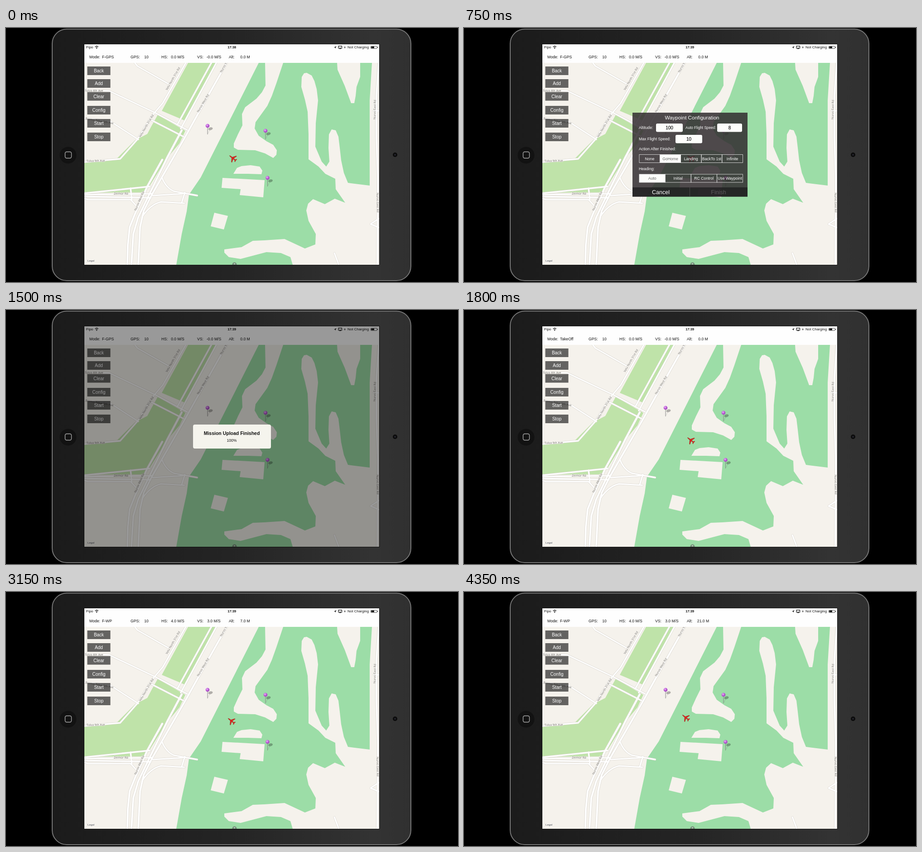
These frames come from a looping animation (998x561 px, 4.5 s). An HTML page:

```html
<!DOCTYPE html>
<html lang="en">
<head>
<meta charset="utf-8">
<title>Waypoint mission</title>
<style>
  html, body { margin: 0; width: 100%; height: 100%; overflow: hidden; background: #000; }
  svg { display: block; width: 998px; height: 561px; font-family: "Liberation Sans", Arial, sans-serif; }
  .mid { text-anchor: middle; }
  .bar { font-size: 8.6px; fill: #111; }
  .status { font-size: 8px; fill: #111; }
  .street { font: 6.6px "Open Sans", sans-serif; fill: #77746f; stroke: #f8f6f2; stroke-width: 1.2; paint-order: stroke; }
  .road { fill: none; stroke-linejoin: round; stroke-linecap: round; }
  .small { font-size: 8.7px; fill: #fff; }
  .box { fill: #fdfdfb; }
  .num { font-size: 10px; fill: #111; stroke: #111; stroke-width: .2; text-anchor: middle; }
</style>
</head>
<body>
<svg viewBox="0 0 998 561">
  <defs>
    <linearGradient id="shell">
      <stop offset="0" stop-color="#1b1b1b"/>
      <stop offset=".5" stop-color="#242424"/>
      <stop offset=".9" stop-color="#333"/>
      <stop offset="1" stop-color="#303030"/>
    </linearGradient>
    <radialGradient id="bead" cx=".38" cy=".35" r=".7">
      <stop offset="0" stop-color="#f0c8fa"/>
      <stop offset=".4" stop-color="#c566de"/>
      <stop offset="1" stop-color="#9a45b4"/>
    </radialGradient>
    <clipPath id="mapArea"><path d="M173 77H824V523H173z"/></clipPath>
    <path id="wide" d="M490 72 L437 166 397 238 355 311 322 368 304 404 296 440 292 523
      M345 291 L312 350 285 410 273 440 269 480 268 523
      M388 226 L356 286 320 360 292 418 281 455 277 523
      M823 77 L818 150 818 240 821 330 820 523"/>
    <path id="thin" d="M455 74 L378 214 M466 74 L386 222
      M398 75 L346 166 322 194 290 246 252 289 173 296
      M173 137 L228 139 329 187 400 225 M320 203 L392 240
      M173 199 L230 206 292 246 M283 75 L290 84 358 123
      M173 365 L318 350 M173 368 L324 366 M173 372 L320 375 M173 376 L180 379 275 379 289 394
      M275 354 L278 380 M345 332 Q354 354 372 361 L422 370 M324 370 L390 366
      M395 363 L388 386 M300 418 Q318 390 342 384 L394 387
      M812 183 H824 M826 419 L805 433 826 442 M725 497 L736 526"/>
  </defs>

  <rect x="102" y="2.5" width="792" height="555.5" rx="32" fill="url(#shell)" stroke="#777" stroke-width="2"/>
  <circle cx="137" cy="281" r="18.5" fill="#121212"/>
  <rect x="130.5" y="273.5" width="14" height="14" rx="3.5" fill="none" stroke="#aaa" stroke-width="1.4"/>
  <circle cx="859" cy="280" r="5" fill="#0b0b0b"/>
  <circle cx="859" cy="280" r="2" fill="#24242c"/>
  <rect x="172" y="35" width="653" height="489" fill="#111"/>
  <rect x="173" y="36" width="651" height="487" fill="#fefefe"/>

  <g clip-path="url(#mapArea)">
    <rect x="173" y="77" width="651" height="446" fill="#f5f2ec"/>
    <path fill="#bfe3a9" d="M402 77H464L396 205 344 183z
      M335 192L396 227 383 255 355 288 315 352 303 363 173 364V294L243 290 285 248 312 234 322 215z"/>
    <path fill="#9cdda7" d="M558 77H572L573 127 565 142 553 156 528 175 521 190 522 215 512 235 503 255 503 264 512 269
      550 270 572 277 590 287 597 280 598 270 590 258 575 250 558 238 549 222 551 208 577 172 587 150 597 122 612 77
      H731L732 92 748 128 762 166 769 166 772 150 774 130 782 108 782 77H808L803 160V348L755 342 746 320 740 292 737 265 734 240
      728 226 719 224 713 235 712 265 714 295 707 306 697 295 683 262 684 210 689 160 686 135 681 117 675 105 664 99 658 100
      653 108 652 130 660 158 666 185 668 235 668 290 690 306 705 322 727 333 728 356 749 386 726 377 704 389 678 378
      667 388 663 403 668 426 684 455 683 478 660 487 615 466 570 469 545 470 520 484 482 489
      V496L492 506 518 510 575 495 607 497 628 506 633 523H376L388 455 399 405 404 368 430 330z"/>
    <path fill="#f5f2ec" d="M502 322L510 309 520 305 540 303 560 306 566 315 564 323 535 322z
      M478 331L571 336 568 374 516 369 518 356 476 353z M460 408L490 415 481 445 452 438z"/>
    <g class="road">
      <use href="#thin" stroke="#dcd8d1" stroke-width="4.4"/>
      <use href="#wide" stroke="#dcd8d1" stroke-width="5.4"/>
      <use href="#thin" stroke="#fff" stroke-width="3"/>
      <use href="#wide" stroke="#fff" stroke-width="3.8"/>
    </g>
    <g id="streets" class="street"></g>
    <circle cx="504.5" cy="522.5" r="5" fill="#76927b"/>
    <circle cx="504.5" cy="521" r="1.4" fill="#c4d8c6"/>
    <text x="180" y="516" font-size="6.2" fill="#444" stroke="#fff" stroke-width="1" paint-order="stroke">Legal</text>
    <g id="pins"></g>
    <g id="plane">
      <path transform="rotate(-52) scale(.9)" fill="#e0211d" stroke="#7c2a20" stroke-width=".5"
        d="M0-10.5Q1.2-9 1.2-5V-2.5L9.5 3V4.6L1.3 1.8 .9 6.5 3.8 8.8V10L0 9-3.8 10V8.8L-.9 6.5-1.3 1.8-9.5 4.6V3L-1.2-2.5V-5Q-1.2-9 0-10.5z"/>
    </g>
  </g>

  <g class="status">
    <text x="177" y="45.3">Fipo</text>
    <g fill="none" stroke="#111" stroke-width="1.2">
      <path d="M196.6 41.6Q200.2 38.4 203.8 41.6M198.2 43.6Q200.2 41.9 202.2 43.6"/>
      <path d="M735.5 44.6H734V39.8H741.5V44.6H740"/>
    </g>
    <circle cx="200.2" cy="45" r=".9"/>
    <path d="M724 43L729.5 40 727 45.8 726.7 43.2zM735.2 46.2L737.8 42.8 740.4 46.2z"/>
    <circle cx="748" cy="42.7" r="2" fill="#8a8a8a"/>
    <text id="clock" class="mid" x="498.7" y="45.3" style="font-size:7.4px" font-weight="bold"></text>
    <text x="754" y="45.3">Not Charging</text>
    <rect x="805.5" y="40.2" width="13.6" height="5.2" rx="1" fill="none" stroke="#111" stroke-width=".7"/>
    <path d="M806.4 41.1H813V44.5H806.4zM819.8 41.8H821V43.8H819.8z"/>
  </g>
  <g class="bar">
    <text x="184" y="66.6">Mode:</text><text id="mode" x="212" y="66.6"></text>
    <text x="275" y="66.6">GPS:</text><text class="mid" x="310" y="66.6">10</text>
    <text x="343" y="66.6">HS:</text><text id="hs" class="mid" x="379" y="66.6"></text>
    <text x="422" y="66.6">VS:</text><text id="vs" class="mid" x="459" y="66.6"></text>
    <text x="492" y="66.6">Alt:</text><text id="alt" class="mid" x="528" y="66.6"></text>
  </g>
  <g id="buttons" class="mid" font-size="10" fill="#fff"></g>

  <g id="dialog" visibility="hidden">
    <rect x="372" y="187" width="254" height="185.5" fill="#322c30" fill-opacity=".85"/>
    <rect x="372" y="352" width="254" height="20.5" fill="#1d1c1e" fill-opacity=".75"/>
    <path d="M498.5 352V372.5" stroke="#555" stroke-width=".8"/>
    <text class="mid" x="503.5" y="202" font-size="11.6" fill="#fff">Waypoint Configuration</text>
    <g class="small">
      <text x="386" y="223">Altitude:</text>
      <text x="489" y="223" style="font-size:8.2px">Auto Flight Speed:</text>
      <text x="386" y="248">Max Flight Speed:</text>
      <text x="386" y="269.5">Action After Finished:</text>
      <text x="386" y="314">Heading:</text>
      <g id="segments" class="mid"></g>
    </g>
    <rect class="box" x="424" y="211" width="59" height="18.5" rx="3"/><text class="num" x="453.5" y="224">100</text>
    <rect class="box" x="559" y="211" width="55" height="18.5" rx="3"/><text class="num" x="586.5" y="224">8</text>
    <rect class="box" x="467" y="236" width="59" height="18.5" rx="3"/><text class="num" x="496.5" y="249">10</text>
    <g class="mid" font-size="12.5" fill="#fff">
      <text x="434.5" y="367">Cancel</text>
      <text id="finish" x="562" y="367">Finish</text>
    </g>
  </g>

  <g id="alert" visibility="hidden">
    <rect x="172" y="35" width="653" height="489" opacity=".4"/>
    <rect x="413" y="253" width="172" height="53" rx="4" fill="#f5f4ed"/>
    <text id="alertTitle" class="mid" x="498.5" y="276" font-size="10.5" font-weight="bold" fill="#111"></text>
    <text id="percent" class="mid" x="498.5" y="291" font-size="8.6" fill="#111"></text>
  </g>
</svg>
<script>
const LOOP = 4500, STEP = 150;
const el = id => document.getElementById(id);
const fill = (id, items, draw) => { el(id).innerHTML = items.map(draw).join(""); };

fill("streets", [
  ["Velu North 31st Rd", 356, 138, -60], ["Velu North 31st Rd", 297, 242, -59],
  ["Nurvo West Rd", 425, 187, -59], ["Nurvo West Rd", 476, 99, -60], ["Nurvo West Rd", 287, 404, -66],
  ["Nurvo East Rd", 816, 202, -89], ["Nurvo East Rd", 818, 364, 89],
  ["Tolva 4th Ave", 174, 141, 0], ["Bremo Tolva 5th Ave", 175, 202, 10],
  ["Tolva 9th Ave", 178, 296, -1], ["Zelmor Rd", 238, 368, 0]
], ([name, x, y, turn]) => `<text transform="translate(${x} ${y}) rotate(${turn})">${name}</text>`);

fill("pins", [[445, 216], [573, 227], [577.5, 331]], ([x, y]) => `<g transform="translate(${x} ${y})">
  <path d="M1 17L5 9" stroke="#000" stroke-opacity=".12"/>
  <ellipse cx="6.5" cy="6.5" rx="5" ry="3" transform="rotate(-15 6.5 6.5)" opacity=".28"/>
  <path d="M0 3V19" stroke="#858585"/><circle r="4.3" fill="url(#bead)"/></g>`);

fill("buttons", [["Back", 85], ["Add", 113], ["Clear", 141.5], ["Config", 172], ["Start", 201], ["Stop", 231]],
  ([name, y]) => `<rect x="179.5" y="${y}" width="51" height="19" fill="#000" fill-opacity=".59"/>
    <text x="205" y="${y + 13}">${name}</text>`);

fill("segments", [
  { y: 279.5, on: 1, names: ["None", "GoHome", "Landing", "BackTo 1st", "Infinite"] },
  { y: 323, on: 0, names: ["Auto", "Initial", "RC Control", "Use Waypoint"] }
], ({ y, on, names }) => {
  const w = 228.5 / names.length;
  const cells = names.map((name, i) => `<rect x="${387 + i * w}" y="${y}" width="${w}" height="18"
      fill="${i === on ? "#fdfdfb" : "none"}" stroke="#eee" stroke-width=".8"/>
    <text x="${387 + (i + .5) * w}" y="${y + 12}" fill="${i === on ? "#666" : "#fff"}">${name}</text>`);
  return cells.join("");
});

// Linear interpolation through [time, value] points
function track(points, t) {
  if (t <= points[0][0]) return points[0][1];
  for (let i = 1; i < points.length; i++) {
    const [t0, a] = points[i - 1], [t1, b] = points[i];
    if (t <= t1) return a + (b - a) * (t - t0) / (t1 - t0);
  }
  return points.at(-1)[1];
}
const altitude = [[1950, 0], [2250, .8], [2550, 1.4], [2700, 2.1], [2850, 3.5], [3750, 14], [4350, 21]];
const ground = [[2400, 0], [2550, 1.4], [2850, 3.8], [3000, 4]];
const climb = [[1950, 0], [2100, .6], [2550, .8], [2700, 1.9], [2850, 2.8], [3000, 3]];
const flight = [[2550, 0], [2850, .1], [4350, 1]];

const show = (id, on) => el(id).setAttribute("visibility", on ? "visible" : "hidden");
const write = (id, text) => { el(id).textContent = text; };

function render(t) {
  write("clock", t < 150 ? "17:38" : "17:39");
  write("mode", t < 1800 ? "F-GPS" : t < 2400 ? "TakeOff" : "F-WP");
  write("hs", track(ground, t).toFixed(1) + " M/S");
  write("vs", (t <= 1950 ? "-0.0" : track(climb, t).toFixed(1)) + " M/S");
  write("alt", track(altitude, t).toFixed(1) + " M");

  show("dialog", t >= 150 && t < 900);
  el("finish").setAttribute("fill", t >= 750 ? "#5c5a5c" : "#fff");

  show("alert", t >= 900 && t < 1800);
  const done = Math.round(track([[750, 0], [1500, 100]], t));
  write("alertTitle", done < 100 ? "Mission Uploading" : "Mission Upload Finished");
  write("percent", done + "%");

  const flown = track(flight, t);
  el("plane").setAttribute("transform", `translate(${500.8 - 11.2 * flown} ${287.6 - 10.2 * flown})`);
}

const start = performance.now();
let last = -1;
function tick() {
  const step = Math.floor((performance.now() - start) % LOOP / STEP);
  if (step !== last) render((last = step) * STEP);
  requestAnimationFrame(tick);
}
tick();
</script>
</body>
</html>
```
